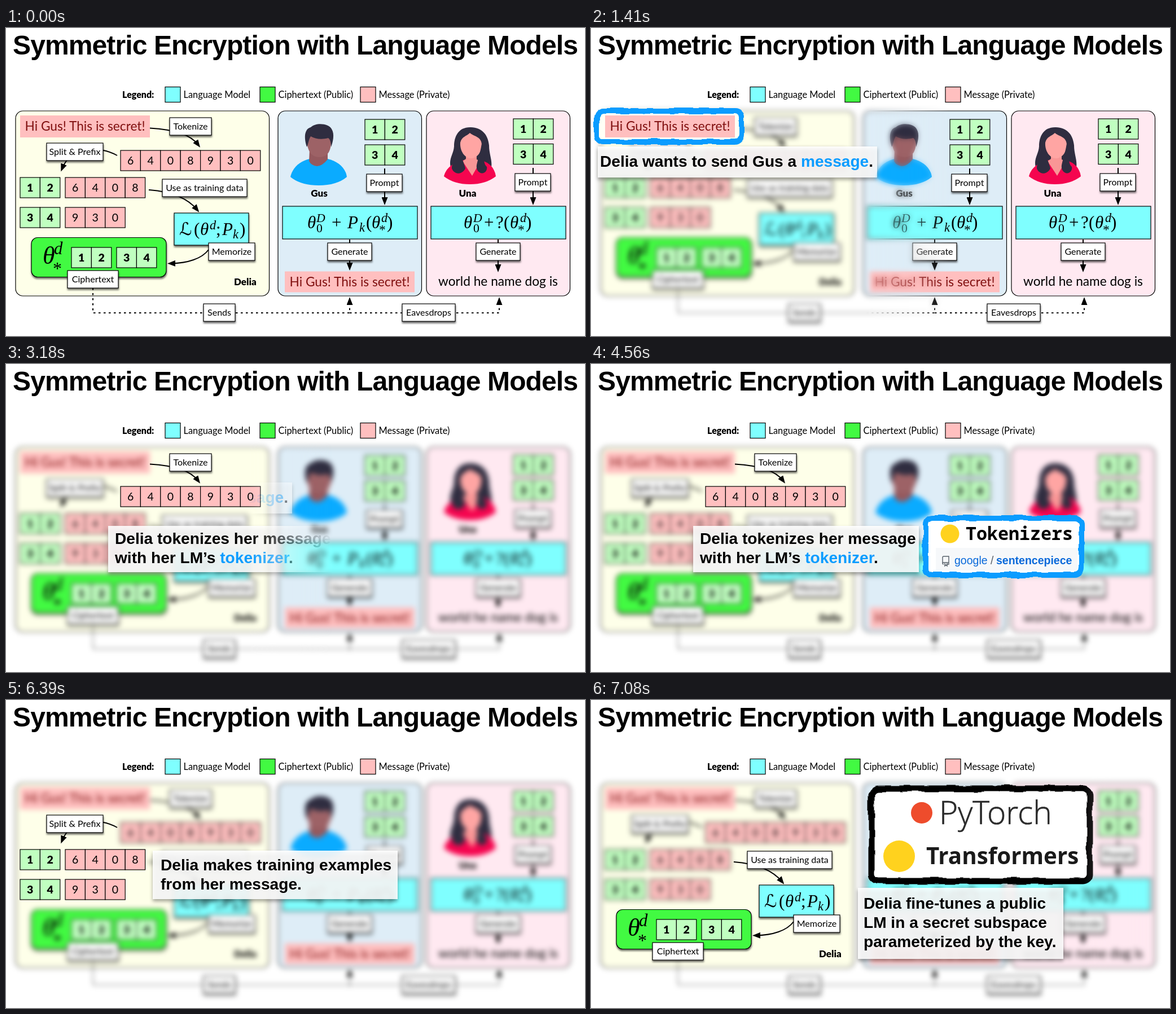
Write an HTML page that moves like this. It is 1026x546 px and loops after 8000 ms.

```html
<!DOCTYPE html>
<html lang="en">
<head>
<meta charset="utf-8">
<title>Symmetric Encryption with Language Models</title>
<style>
  html, body { margin: 0; width: 100%; height: 100%; overflow: hidden; background: #fff; }
  svg { position: absolute; left: 0; top: 0; width: 1026px; height: 546px; }
  filter { color-interpolation-filters: sRGB; }
  .slide { background: #fff; }
  text { font-family: Lato, sans-serif; white-space: pre; }
  .head { font: bold 48px "Liberation Sans", Arial, sans-serif; letter-spacing: -.0185em; }
  .cap { font: bold 28.1px "Liberation Sans", Arial, sans-serif; }
  .repo { font: 19.5px "Liberation Sans", Arial, sans-serif; }
  .mono { font: 600 31.7px "Noto Sans Mono", monospace; }
  .light { font: 300 56.8px "Open Sans", sans-serif; stroke: #2b2b2b; stroke-width: .7; }
  .semi { font: bold 40.3px "Open Sans", sans-serif; }
  .math { font-family: "Liberation Serif", "DejaVu Sans", serif; }
  .line { fill: none; stroke: #000; stroke-width: 2; marker-end: url(#tip); }
  .dash { stroke-dasharray: 3.5 5.5; }
  .bold { font-weight: 900; }
</style>
</head>
<body>
<script>
const INK = '#000', CYAN = '#7fffff', GREEN = '#42fa42', MINT = '#c0ffc0', PINK = '#ffbfbf';
const BLUE = '#0b9cff', HAIR = '#2f2d40', YELLOW = '#ffd21e';

const rect = (x, y, w, h, fill, more = '') =>
  `<rect x="${x}" y="${y}" width="${w}" height="${h}" fill="${fill}" ${more}/>`;
const box = (x, y, w, h, fill, more = '') =>
  rect(x, y, w, h, fill, `stroke="#000" stroke-width="1.2" ${more}`);
const text = (x, y, size, s, more = '') =>
  `<text x="${x}" y="${y}" font-size="${size}" ${more}>${s}</text>`;
const mid = (x, y, size, s, more = '') => text(x, y, size, s, `text-anchor="middle" ${more}`);
const styled = (cls, x, y, s, more = '') => `<text class="${cls}" x="${x}" y="${y}" ${more}>${s}</text>`;
const line = (d, cls = '') => `<path class="line ${cls}" d="${d}"/>`;
const shape = (fill, d) => `<path fill="${fill}" d="${d}"/>`;
const dot = (x, y, r, fill) => `<circle cx="${x}" cy="${y}" r="${r}" fill="${fill}"/>`;

const label = (x, y, w, s) =>
  box(x, y, w, 31, '#fff', 'filter="url(#drop)"') + mid(x + w / 2, y + 20.5, 16, s);

const cells = (x, y, digits, fill, cls = '') => [...digits].map((d, i) =>
  box(x + i * 35.4, y, 35.4, 36, fill) +
  mid(x + i * 35.4 + 17.7, y + 25, 19.5, d, `class="${cls}"`)).join('');
const pair = (x, y, digits) => cells(x, y, digits, MINT, 'bold');

// Each part: [characters, x, vertical shift, scale]
const math = (y, size, ...parts) => parts.map(([s, x, dy = 0, k = 1]) =>
  text(x, y + dy, size * k, s, `class="math" font-style="${/[a-zθ]/i.test(s) ? 'italic' : 'normal'}"`)).join('');

const secret = (x, y, h) =>
  rect(x, y, 230, h, PINK) + text(x + 8.5, y + 26.5, 22.7, 'Hi Gus! This is secret!', 'fill="#801010"');

const scrawl = (x, y, w, h, color, width, fill) =>
  rect(x, y, w, h, fill, `rx="12" stroke="${color}" stroke-width="${width}" filter="url(#rough)"`);

const caption = (x, y, w, h, tx, ty, ...rows) =>
  rect(x, y, w, h, '#fff', 'fill-opacity=".88" filter="url(#lift)"') +
  rows.map((s, i) => styled('cap', tx, ty + i * 34, s)).join('');
const blue = s => `<tspan fill="${BLUE}">${s}</tspan>`;

// One receiver column: chips, prompt, model and generation
const receiver = (x, dy, name, end) =>
  pair(x + 154, 162 + dy, '12') + pair(x + 154, 207 + 1.5 * dy, '34') +
  line(`M${x + 189},${249 + dy}V308`) + label(x + 157, 259 + dy, 63, 'Prompt') +
  box(x + 8, 316, 239, 58, CYAN) +
  line(`M${x + 127},375V${end}`) + label(x + 88, 381, 78, 'Generate') +
  mid(x + 73, 299, 17, name, 'class="bold"');

const gus =
  shape('#0aabff', 'M504,264C508,246 522,236 538,232H570C588,236 602,248 604,264Q586,279 554,279Q522,279 504,264Z') +
  shape('#94595e', 'M538,215H570V233Q560,245 551,245Q541,244 537,236Z') +
  shape('#9d6266', 'M533,196C533,180 576,180 576,196C577,215 572,229 555,229C538,229 533,212 533,196Z') +
  shape(HAIR, 'M533,211C526,188 532,178 540,176C549,167 572,169 577,179C583,188 579,203 576,211C576,202 574,197 571,195C560,198 548,197 540,192C536,198 536,205 533,211Z');

const una =
  shape(HAIR, 'M824,176C802,175 794,192 794,210C793,224 784,232 788,247C792,258 806,261 816,254H836C848,265 862,260 860,247C862,234 856,224 856,208C854,188 843,177 824,176Z') +
  shape('#f5054f', 'M776,263C780,246 796,237 811,234L825,250L839,234C856,237 866,248 868,263Q850,277 822,277Q794,277 776,263Z') +
  shape('#f99696', 'M815,220H834V233L841,236L826,262L809,236L815,232Z') +
  shape('#ffa5a3', 'M805,203C808,192 816,192 822,186C828,192 842,192 843,206C843,221 834,231 824,231C813,231 804,218 805,203Z') +
  shape(HAIR, 'M843,205C852,222 842,236 852,246C854,256 842,262 836,253C830,245 838,235 843,205ZM805,203C802,222 812,238 814,249C808,261 794,260 790,249C790,236 800,228 805,203Z');

const parts = {
  base:
    box(17, 147, 449.5, 328, '#feffe9', 'rx="13"') +
    box(482, 147, 254.5, 328, '#deedf7', 'rx="13"') +
    box(745, 147, 254.5, 328, '#ffe9f1', 'rx="13"') +
    line('M154,461V505H609V483', 'dash') + line('M609,505H874V483', 'dash') +
    label(350, 489, 56, 'Sends') + label(702, 489, 94, 'Eavesdrops'),
  message: secret(25, 155, 39),
  tokens:
    line('M255,177.5C300,180 328,190 340.5,207') + label(290, 159, 74, 'Tokenize') +
    cells(203, 217, '6408930', PINK),
  split:
    line('M197,226C165,208 115,210 99.5,249') + label(72, 204, 100, 'Split &amp; Prefix') +
    pair(25, 265, '12') + cells(105, 265, '6408', PINK) +
    pair(25, 318, '34') + cells(105, 318, '930', PINK),
  train:
    line('M253,287C292,290 322,302 338.5,322') + label(277, 268, 150, 'Use as training data') +
    box(298, 328, 132, 57, CYAN, 'filter="url(#drop)"') +
    math(367, 31, ['ℒ', 307], ['(', 333], ['θ', 344], ['d', 361, -10, .72], [';', 372], ['P', 383], ['k', 402, 6, .72], [')', 414]) +
    line('M359,393C347,409 322,417 292,417.5') + label(359, 381, 82, 'Memorize') +
    box(45, 371.5, 239, 70, GREEN, 'rx="11" filter="url(#drop)"') +
    math(418, 44, ['θ', 65], ['d', 85, -17, .7], ['*', 83, 19, .73]) +
    pair(116, 389, '12') + pair(196, 389, '34') +
    label(109, 430, 90, 'Ciphertext') + text(404, 456, 17, 'Delia', 'class="bold"'),
  receivers:
    gus + una + receiver(482, 0, 'Gus', 424) + receiver(745, -1, 'Una', 427) +
    math(355, 31, ['θ', 534], ['D', 550, -11, .7], ['0', 550, 7, .7], ['+', 577], ['P', 605], ['k', 626, 6, .72],
      ['(', 638], ['θ', 648], ['d', 665, -11, .72], ['*', 661, 10, .76], [')', 675]) +
    math(355, 31, ['θ', 811], ['D', 828, -11, .7], ['0', 828, 7, .7], ['+', 847], ['?', 868],
      ['(', 882], ['θ', 893], ['d', 911, -11, .72], ['*', 907, 10, .76], [')', 921]) +
    secret(494, 431.5, 37) + mid(872, 457, 22.7, 'world he name dog is'),
};

const use = id => `<use href="#${id}"/>`;
// Everything blurred except one part, with notes on top
const focus = (id, below, above) => `<g filter="url(#blur)">` +
  Object.keys(parts).filter(k => k !== id).map(use).join('') + `</g>${below}${use(id)}${above}`;

const slides = [
  `<defs>
    <marker id="tip" markerUnits="userSpaceOnUse" markerWidth="14" markerHeight="11" refX="8" refY="5.5" orient="auto">
      <path d="M0,0L14,5.5L0,11Z"/></marker>
    <filter id="drop" x="-20%" y="-30%" width="140%" height="180%"><feDropShadow dx=".5" dy="3" stdDeviation="1.8" flood-opacity=".55"/></filter>
    <filter id="lift" x="-10%" y="-20%" width="120%" height="150%"><feDropShadow dx="0" dy="4" stdDeviation="3" flood-opacity=".4"/></filter>
    <filter id="blur"><feGaussianBlur stdDeviation="4.8"/></filter>
    <filter id="rough"><feTurbulence type="fractalNoise" baseFrequency=".04" seed="4"/>
      <feDisplacementMap in="SourceGraphic" scale="8" xChannelSelector="R" yChannelSelector="G"/></filter>
  </defs>` + Object.entries(parts).map(([id, s]) => `<g id="${id}">${s}</g>`).join(''),

  focus('message', scrawl(10, 147, 256, 55, BLUE, 10, '#fffff6'),
    caption(12, 210, 495, 55, 16, 246, `Delia wants to send Gus a ${blue('message')}.`)),

  focus('tokens', '',
    caption(181, 287, 400, 82, 193, 319, 'Delia tokenizes her message', `with her LM’s ${blue('tokenizer')}.`) +
    scrawl(593, 273, 276, 101, BLUE, 10, '#fff') + dot(636, 301, 16.5, YELLOW) +
    styled('mono', 664, 312, 'Tokenizers') + rect(611, 326, 251, 40, '#f6f8fa') +
    '<path d="M623,353V343Q623,341 625,341H634V352H625Q623,352 623,354Q623,355 625,355M631,355H634V352M627,353V358L629,356L631,358V353" fill="none" stroke="#57606a" stroke-width="1.4"/>' +
    styled('repo', 644, 355, 'google', 'fill="#0969da"') + styled('repo', 708, 355, '/', 'fill="#57606a"') +
    styled('repo', 718, 355, 'sentencepiece', 'fill="#0969da" style="font-weight:bold"')),

  focus('split', '',
    caption(260, 267, 434, 86, 274, 302, 'Delia makes training examples', 'from her message.')),

  focus('train', '',
    scrawl(497, 157, 387, 164, INK, 11, '#fff') + dot(586, 200, 19, '#ee4c2c') +
    styled('light', 617, 220, 'PyTorch', 'fill="#2b2b2b"') + dot(546, 277, 28, YELLOW) +
    styled('semi', 594, 291, 'Transformers', 'fill="#1a1a1a"') +
    caption(473, 333, 364, 126, 483, 370, 'Delia fine-tunes a public', 'LM in a secret subspace', 'parameterized by the key.')),
];

const legend = [[282, CYAN, 'Language Model'], [450, GREEN, 'Ciphertext (Public)'], [628, PINK, 'Message (Private)']];
const header = styled('head', 12, 47, 'Symmetric Encryption with Language Models') +
  text(206, 123.5, 16, 'Legend:', 'class="bold"') +
  legend.map(([x, fill, s]) => box(x, 104.5, 27, 27, fill) + text(x + 32.5, 123.5, 16.4, s)).join('');

document.body.innerHTML = slides.map(s => `<svg class="slide">${s}</svg>`).join('') + `<svg>${header}</svg>`;

const layers = [...document.querySelectorAll('.slide')];
const starts = [0, 980, 2790, 4560, 6390];
const LOOP = 8000, EDGE = 150, SPEED = 1.48;

function draw() {
  const t = performance.now() % LOOP;
  layers.forEach((layer, i) => {
    if (!i) return;
    const rear = (t - starts[i]) * SPEED - EDGE;
    layer.style.visibility = rear > -EDGE ? 'visible' : 'hidden';
    layer.style.maskImage = rear > 1026 ? 'none'
      : `linear-gradient(90deg, #000 ${rear}px, transparent ${rear + EDGE}px)`;
  });
  requestAnimationFrame(draw);
}
draw();
</script>
</body>
</html>
```
